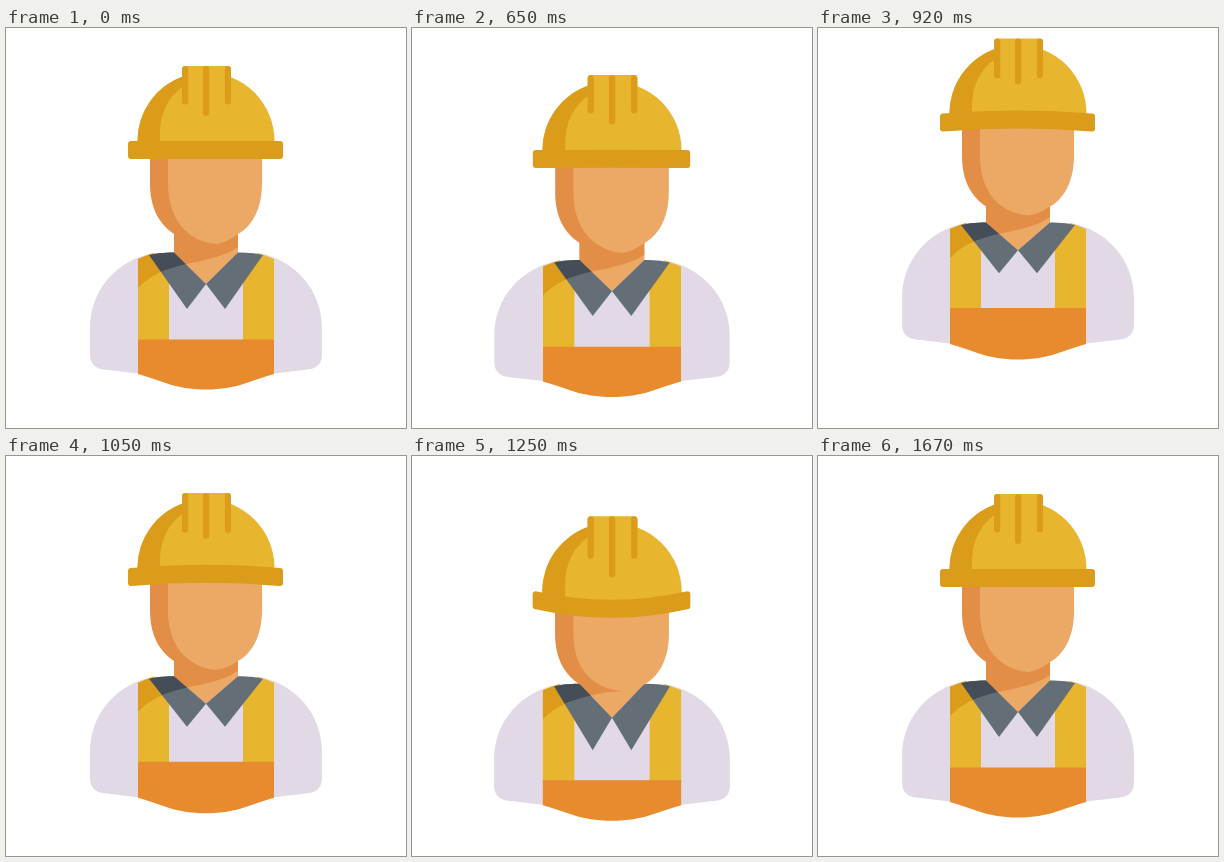
Recreate the animation shown at these times as an HTML page with a canvas. Size 400x400 px, loop 1700 ms.

```html
<!DOCTYPE html>
<html lang="en">
<head>
<meta charset="utf-8">
<title>Hopping builder</title>
<style>
html, body { margin: 0; width: 100%; height: 100%; overflow: hidden; background: #fff; }
canvas { display: block; }
</style>
</head>
<body>
<canvas id="stage" width="400" height="400"></canvas>
<script>
const ctx = document.getElementById('stage').getContext('2d');
const LOOP = 1700, STEP = 25;

const C = {
  shirt: '#e1d9e5', yellow: '#e8b52f', gold: '#db9b1b', orange: '#e78b2e',
  skin: '#eca966', tan: '#e38e46', collar: '#646e77', slate: '#454e58'
};

// Each track is a list of [time, value].
const tracks = {
  body: [[500, 0], [525, 3.7], [620, 10], [750, -15], [870, -35.5], [1050, -4.3], [1190, 10],
         [1250, 3.3], [1400, -2], [1460, -9], [1550, 0], [1600, 1.5], [1675, 0]],
  head: [[500, 0], [525, .6], [620, 1], [750, 3], [870, 2.5], [1050, 3.2], [1250, 19], [1400, 0]],
  nod: [[620, 0], [750, -.4], [900, -.55], [1050, -.6], [1250, 1], [1400, 0]],
  squash: [[500, 0], [525, 1], [620, 2], [750, 0], [1050, 0], [1190, 3.5], [1250, 2], [1400, 0]]
};

// Smooth interpolation that rests at every turning point.
function sample(keys, t) {
  const last = keys.length - 1;
  if (t <= keys[0][0]) return keys[0][1];
  if (t >= keys[last][0]) return keys[last][1];
  const slope = i => (keys[i + 1][1] - keys[i][1]) / (keys[i + 1][0] - keys[i][0]);
  const tangent = i => {
    if (i === 0 || i === last) return 0;
    const a = slope(i - 1), b = slope(i);
    return a * b <= 0 ? 0 : 2 * a * b / (a + b);
  };
  const i = keys.findIndex(k => k[0] > t) - 1;
  const [t0, v0] = keys[i], [t1, v1] = keys[i + 1];
  const d = t1 - t0, u = (t - t0) / d, e = u * u * (3 - 2 * u);
  return v0 + (v1 - v0) * e
    + d * (tangent(i) * u * (1 - u) ** 2 - tangent(i + 1) * u * u * (1 - u));
}

function fill(path, color) {
  ctx.fillStyle = color;
  ctx.fill(new Path2D(path));
}

function ridge(x, bottom) {
  ctx.fillStyle = C.gold;
  ctx.beginPath();
  ctx.roundRect(x, 38, 6.2, bottom - 38, 3);
  ctx.fill();
}

function drawTorso(nod) {
  const tip = 281 + 10 * nod;
  const vee = 256 + 5 * nod - 2.5 * nod * nod;
  const bib = 311.5 + 5 * nod + 4.5 * nod * nod;
  const neck = `M168 195H232V225L200 ${vee}L168 225Z`;
  const strap = `M132 231Q139 228 148 225L163 245V${bib + 1}H132Z`;
  const leftCollar = `M143 227Q154 224 168 224.5L200 ${vee}L181 ${tip}Z`;

  fill('M84 300C84 263 110 232 148 225H252C290 232 316 263 316 300V326Q316 340 302 341.5' +
       'L268 345.5H132L98 341.5Q84 340 84 326Z', C.shirt);
  fill(strap, C.yellow);
  fill(`M268 231Q261 228 252 225L237 245V${bib + 1}H268Z`, C.yellow);
  fill(`M132 ${bib}H268V346C245 352 232 361.5 200 361.5C168 361.5 155 352 132 346Z`, C.orange);
  fill(neck, C.skin);
  fill(leftCollar, C.collar);
  fill(`M257 227Q246 224 232 224.5L200 ${vee}L219 ${tip}Z`, C.collar);

  // Shadow cast by the head
  ctx.save();
  ctx.clip(new Path2D('M132 260C144 247 160 241 178 236.5C200 232 220 228 232 219V190H132Z'));
  fill(strap, C.gold);
  fill(neck, C.tan);
  fill(leftCollar, C.slate);
  ctx.restore();
}

function drawHead(nod) {
  const bend = nod * (6.5 + 2 * nod);
  const chin = 216 - 3 * nod * nod;

  fill(`M144 122V155C144 180 153 196 168 206C180 213 195 ${chin + 1} 210 ${chin}L220 150V122Z`, C.tan);
  fill(`M162 122V155C162 190 180 ${chin - 3} 210 ${chin}` +
       `Q220 ${chin - 1} 232 206C248 197 256 178 256 155V122Z`, C.skin);

  fill('M131.5 122V113A68.5 68.5 0 0 1 268.5 113V122Z', C.yellow);
  fill('M131.5 122V113A68.5 68.5 0 0 1 178 48V58C162 68 154 86 154 105V122Z', C.gold);
  fill('M176 60V42Q176 38 180 38H221Q225 38 225 42V60Z', C.yellow);
  const side = 76.5 + 4 * nod * nod;
  ridge(176, side);
  ridge(197, 88 + 1.3 * bend);
  ridge(218.8, side);

  const top = 113 + 2 * bend, low = 131 + 2 * bend;
  fill(`M125 113Q200 ${top} 274 113Q277 113 277 116V128Q277 131 274 131` +
       `Q200 ${low} 125 131Q122 131 122 128V116Q122 113 125 113Z`, C.gold);
}

function draw(t) {
  const body = sample(tracks.body, t), nod = sample(tracks.nod, t);
  const wide = 1 + sample(tracks.squash, t) / 116;
  const place = y => ctx.setTransform(wide, 0, 0, 1, 200 * (1 - wide), y);

  ctx.setTransform(1, 0, 0, 1, 0, 0);
  ctx.fillStyle = '#fff';
  ctx.fillRect(0, 0, 400, 400);
  place(body);
  drawTorso(nod);
  place(body + sample(tracks.head, t));
  drawHead(nod);
}

const start = performance.now();
function tick() {
  const t = (performance.now() - start) % LOOP;
  draw(Math.floor(t / STEP + .2) * STEP);
  requestAnimationFrame(tick);
}
tick();
</script>
</body>
</html>
```
